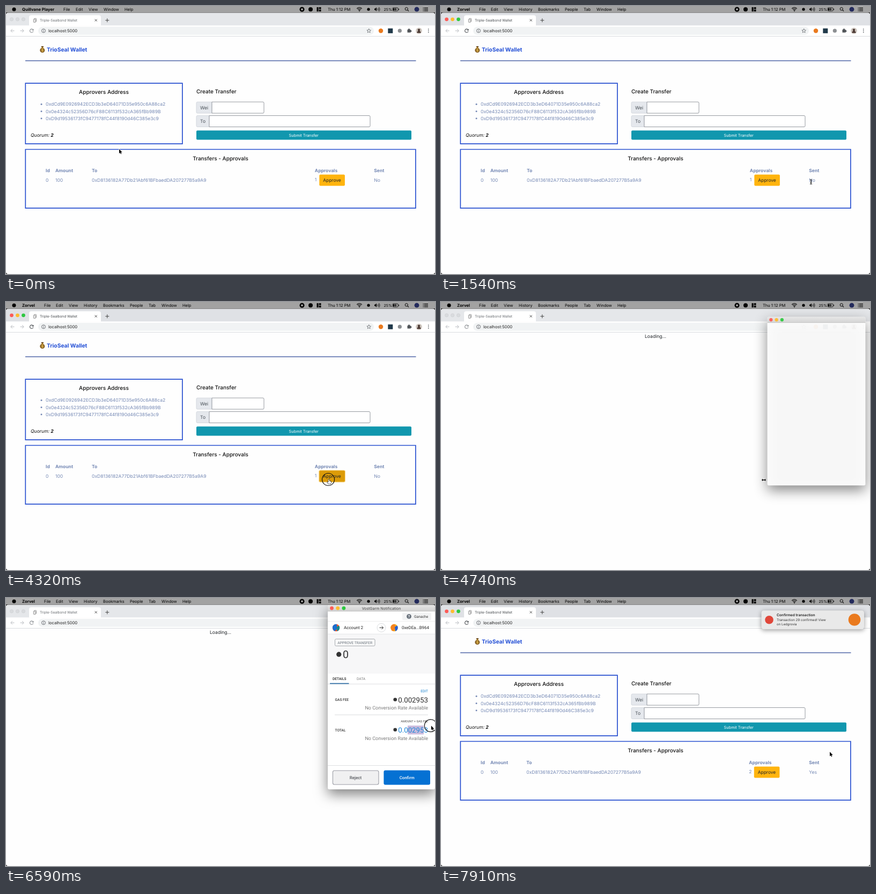
An HTML page with a canvas for the animation above (8000 ms loop, 800 px wide and 500 px high).

```html
<!DOCTYPE html>
<html lang="en">
<head>
<meta charset="utf-8">
<title>Wallet demo</title>
<style>
html, body { margin: 0; width: 100%; height: 100%; overflow: hidden; background: #fff; }
canvas { display: block; width: 800px; height: 500px; }
</style>
</head>
<body>
<canvas id="stage"></canvas>
<script>
const LOOP = 8000;
const SANS = 'Inter, "Liberation Sans", sans-serif';
const ROBOTO = 'Roboto, "Liberation Sans", sans-serif';
const BLUE = '#2850d0', SLATE = '#7488b4', ORANGE = '#ea7a1e';
const LIGHTS = ['#fc5b57', '#fdbc2f', '#2dc840'];

// Moments of the story, in ms
const T = {
  focus: 600, press: 4300, loading: 4430, popup: 4640, title: 4950, logo: 5130,
  confirm: 5740, drag: 6320, drop: 6680, accept: 6930, close: 7060, done: 7600, note: 7560
};
const PRESSES = [[T.focus - 40, T.focus + 60], [T.press, T.loading], [T.drag, T.drop], [T.accept, T.close]];

const ROUTE = [
  [0, 211, 267], [110, 211, 267], [520, 450, 348], [700, 465, 352], [820, 480, 350],
  [1300, 706, 344], [1500, 690, 328], [1700, 690, 328], [2080, 672, 368], [2420, 626, 374],
  [2760, 602, 331], [5560, 602, 331], [5860, 690, 292], [6260, 749, 246], [6320, 749, 246],
  [6570, 793, 238], [6690, 792, 240], [6900, 748, 333], [7080, 748, 333], [7500, 728, 295],
  [7850, 725, 287], [8000, 725, 287]
];

const canvas = document.getElementById('stage');
const ctx = canvas.getContext('2d');
const dpr = window.devicePixelRatio || 1;
canvas.width = 800 * dpr;
canvas.height = 500 * dpr;

const clamp = v => Math.min(1, Math.max(0, v));
const span = (t, a, b) => clamp((t - a) / (b - a));
const smooth = v => v * v * (3 - 2 * v);
const easeOut = v => 1 - (1 - v) ** 3;

function type(s, x, y, size, color = '#111', weight = 400, align = 'left', family = SANS) {
  ctx.font = `${weight} ${size}px ${family}`;
  ctx.textAlign = align;
  ctx.fillStyle = color;
  ctx.fillText(s, x, y);
}

function roboto(s, x, y, size, color, weight, align) {
  type(s, x, y, size, color, weight, align, ROBOTO);
}

function rect(x, y, w, h, color) {
  ctx.fillStyle = color;
  ctx.fillRect(x, y, w, h);
}

function box(x, y, w, h, r, fill, stroke, lw = 1) {
  ctx.beginPath();
  ctx.roundRect(x, y, w, h, r);
  if (fill) { ctx.fillStyle = fill; ctx.fill(); }
  if (stroke) { ctx.strokeStyle = stroke; ctx.lineWidth = lw; ctx.stroke(); }
}

function dot(x, y, r, color) {
  ctx.beginPath();
  ctx.arc(x, y, r, 0, 7);
  ctx.fillStyle = color;
  ctx.fill();
}

function arc(x, y, r, color, lw = 1, from = 0, to = 2 * Math.PI) {
  ctx.beginPath();
  ctx.arc(x, y, r, from, to);
  ctx.strokeStyle = color;
  ctx.lineWidth = lw;
  ctx.stroke();
}

function trace(points) {
  ctx.beginPath();
  for (let i = 0; i < points.length; i += 2) ctx.lineTo(points[i], points[i + 1]);
}

function line(color, lw, ...points) {
  trace(points);
  ctx.strokeStyle = color;
  ctx.lineWidth = lw;
  ctx.stroke();
}

function poly(color, ...points) {
  trace(points);
  ctx.closePath();
  ctx.fillStyle = color;
  ctx.fill();
}

function withShadow(blur, dy, alpha, draw) {
  ctx.save();
  ctx.shadowColor = `rgba(0,0,0,${alpha})`;
  ctx.shadowBlur = blur * dpr;
  ctx.shadowOffsetY = dy * dpr;
  draw();
  ctx.restore();
}

function menuBar(active) {
  rect(0, 0, 800, 12.2, '#a2a2a2');
  dot(15, 6.2, 3.5, '#000');
  type(active ? 'Zorvel' : 'Quillvane Player', 30, 9, 7.6, '#000', 700);
  const menus = active
    ? [['File', 71], ['Edit', 93], ['View', 117], ['History', 145], ['Bookmarks', 181],
       ['People', 231], ['Tab', 266], ['Window', 290], ['Help', 329]]
    : [['File', 107], ['Edit', 130], ['View', 154], ['Window', 182], ['Help', 221]];
  for (const [s, x] of menus) type(s, x, 9, 7.5, '#000');

  dot(552, 6.2, 4.5, '#000');
  box(550.2, 4.4, 3.6, 3.6, 1, '#a2a2a2');
  dot(568, 6.2, 4, '#000');
  rect(579.5, 2.2, 3.2, 8, '#000');
  rect(583.7, 2.2, 3.8, 3.5, '#000');
  rect(583.7, 6.7, 3.8, 3.5, '#000');
  type('Thu 1:12 PM', 600, 9, 7.5, '#000');
  for (const r of [2.4, 4.6, 6.8]) arc(659, 9.6, r, '#000', 1.1, -2.35, -0.79);
  dot(659, 9.3, 0.9, '#000');
  dot(676, 6.2, 2.6, '#000');
  poly('#000', 687, 4.8, 688.6, 4.8, 691, 2.6, 691, 9.8, 688.6, 7.6, 687, 7.6);
  for (const r of [2, 4, 6]) arc(691, 6.2, r, '#000', 0.8, -0.75, 0.75);
  type('25%', 704.5, 8.8, 7, '#000');
  box(721, 3.2, 10, 6, 1.2, null, '#000', 0.8);
  rect(722, 4.2, 2.4, 4, '#000');
  rect(732, 5, 1, 2.4, '#000');
  poly('#000', 727.5, 2.8, 724.5, 6.7, 726.6, 6.7, 725.6, 9.8, 728.8, 5.6, 726.8, 5.6);
  arc(746.8, 5.4, 2.6, '#000');
  line('#000', 1.1, 748.7, 7.3, 751, 9.7);
  dot(766, 6.2, 4.4, '#232a5c');
  for (let i = 0; i < 3; i++) {
    rect(777.5, 3 + i * 2.7, 1.2, 1.1, '#000');
    rect(779.6, 3 + i * 2.7, 7.4, 1.1, '#000');
  }
}

function star(x, y, r) {
  ctx.beginPath();
  for (let i = 0; i < 10; i++) {
    const a = i * Math.PI / 5 - Math.PI / 2, d = i % 2 ? r * 0.45 : r;
    ctx.lineTo(x + d * Math.cos(a), y + d * Math.sin(a));
  }
  ctx.closePath();
  ctx.strokeStyle = '#5f6368';
  ctx.lineWidth = 0.8;
  ctx.stroke();
}

function browser(active) {
  rect(0, 12.2, 800, 488, '#151515');
  box(0, 12.8, 800, 487.2, 4, '#fefefe');
  box(0, 12.8, 800, 23.7, [4, 4, 0, 0], active ? '#dfe1e5' : '#e5e7ea');
  [10.5, 21.5, 32.5].forEach((x, i) =>
    active ? dot(x, 24.8, 3.4, LIGHTS[i]) : box(x - 3.2, 21.6, 6.4, 6.4, 3.2, '#d9dbde', '#cdcfd2', 0.6));
  box(43, 17.3, 134, 19.5, [4, 4, 0, 0], '#fff');
  box(52.6, 23.2, 4, 6, 0.8, '#fff', '#777', 0.7);
  box(51.3, 24.5, 4, 6, 0.8, '#e6e6e6', '#777', 0.7);
  type('Triple-Sealbond Wallet', 63, 29, 6.5, active ? '#44484c' : '#666a6e');
  line('#444', 1, 165.7, 24.6, 169.7, 28.6);
  line('#444', 1, 169.7, 24.6, 165.7, 28.6);
  line('#444', 1, 185.3, 26.7, 192.3, 26.7);
  line('#444', 1, 188.8, 23.2, 188.8, 30.2);

  rect(0, 36.5, 800, 20, '#fff');
  line('#b9bcc0', 1, 12, 43, 8.8, 46.2, 12, 49.4);
  line('#b9bcc0', 1, 9, 46.2, 15.5, 46.2);
  line('#b9bcc0', 1, 30, 43, 33.2, 46.2, 30, 49.4);
  line('#b9bcc0', 1, 26.5, 46.2, 33, 46.2);
  const ink = active ? '#4f5357' : '#909498';
  arc(47.8, 46.2, 3.2, ink, 1.1, 0.3, 5.5);
  poly(ink, 51.6, 42.4, 51.6, 45.8, 48.2, 45.8);
  box(60, 38.8, 626, 15, 7.5, '#f1f3f4');
  arc(70, 46.2, 3.5, '#5f6368', 0.9);
  rect(69.5, 45.8, 1, 2.4, '#5f6368');
  rect(69.5, 44, 1, 1, '#5f6368');
  type('localhost:5000', 79, 49, 7.7, '#222');
  star(676.7, 46.4, 4);
  dot(699, 46.2, 4.2, ORANGE);
  rect(712.3, 41.8, 9, 9, '#20394a');
  dot(734.3, 46.2, 3.6, '#8c8f92');
  box(748.5, 44, 6.2, 5.6, 0.6, '#505458');
  dot(751.5, 43.6, 1.5, '#505458');
  dot(755, 46.8, 1.5, '#505458');
  dot(770, 46.2, 5.8, '#cfc7c0');
  dot(770, 44.8, 2.2, '#4a3832');
  ctx.beginPath();
  ctx.arc(770, 50.2, 3.6, Math.PI, 0);
  ctx.fill();
  for (const y of [43.2, 46.2, 49.2]) dot(787.8, y, 0.85, '#5f6368');
  rect(0, 56, 800, 0.9, '#d5d8dc');
}

function moneyBag(x, y) {
  poly('#6b4a1f', x - 2.3, y - 6, x + 2.5, y - 6, x + 1.3, y - 3, x - 1.1, y - 3);
  ctx.beginPath();
  ctx.ellipse(x, y + 1.6, 4.6, 4.5, 0, 0, 7);
  ctx.fillStyle = '#8a6428';
  ctx.fill();
  rect(x - 1.8, y - 3.4, 3.8, 1.2, '#e8b23c');
  type('$', x, y + 4, 6.5, '#f6cc56', 700, 'center');
}

function field(label, y, split, right) {
  box(355, y, split - 355, 21, [2, 0, 0, 2], '#e5e8ed', '#cdd2d9', 0.8);
  type(label, 362, y + 13.8, 8.6, '#495057');
  box(split, y, right - split, 21, [0, 2, 2, 0], '#fff', '#8b8f96', 0.9);
}

function walletPage(done, hover, pressed) {
  moneyBag(67.8, 81);
  type('TrioSeal Wallet', 76, 84.8, 10.3, '#2450d6', 700);
  rect(36, 101.2, 728.5, 1.9, '#7284b8');

  box(36.3, 144.2, 292.6, 113, 0, null, BLUE, 1.7);
  type('Approvers Address', 182.5, 164.3, 10.1, '#111', 500, 'center');
  ['0xdCd9E0926942ECD3b3eD64071D35e950c6A88ca2',
   '0x0e4324c52356D76cF88C6113f532cA365fBb989B',
   '0xD9d19536173fC9477178fC44f8190d46C385e3c9'].forEach((s, i) => {
    dot(66, 183.2 + i * 13.3, 1.5, SLATE);
    type(s, 74, 186.2 + i * 13.3, 8.6, SLATE);
  });
  type('Quorum:', 46, 244, 8.6, '#111', 'italic 400');
  type('2', 83.3, 244, 8.6, '#111', 'italic 700');

  type('Create Transfer', 355, 162.6, 10, '#111', 500);
  field('Wei', 179, 384, 481);
  field('To', 204.5, 379, 679);
  box(355, 232.3, 401, 17.3, 2, '#1197ae');
  type('Submit Transfer', 555.2, 243.7, 7.35, '#fff', 400, 'center');

  box(36.3, 267.5, 727.6, 109.7, 0, null, BLUE, 1.7);
  type('Transfers - Approvals', 400, 287.6, 10, '#111', 500, 'center');
  const to = done ? 159.3 : 160, count = done ? 574.2 : 575.8, nudge = done ? -0.5 : 0;
  [['Id', 74], ['Amount', 92], ['To', to], ['Approvals', count], ['Sent', 686.3]]
    .forEach(([s, x]) => type(s, x, 310.2, 8.5, SLATE, 700));
  [['0', 74], ['100', 92], ['0xD8136182A77Db21Abf61BFbaedDA207277B5a9A9', to],
   [done ? 'Yes' : 'No', 686.3]].forEach(([s, x]) => type(s, x, 328.3, 8.55, SLATE));
  type(done ? '2' : '1', count, 327.2, 8.55, SLATE);
  if (pressed) box(583, 313.5, 50, 23, 3, '#fbdc94');
  box(584.3 + nudge, 314.6, 47.6, 20.8, 2, pressed ? '#dc9b08' : hover ? '#eea708' : '#ffb40e');
  type('Approve', 608 + nudge, 328.3, 8.4, '#212529', 400, 'center');
}

function badge(x, base, a, b) {
  ctx.save();
  ctx.beginPath();
  ctx.arc(x, 55.5, 6.8, 0, 7);
  ctx.clip();
  rect(x - 7, 48, 14, 15, base);
  poly(a, x - 8, 52, x + 1, 47, x + 2, 57, x - 4, 64);
  poly(b, x + 1, 54, x + 8, 50, x + 8, 60, x + 2, 63);
  ctx.restore();
}

function amount(y, color) {
  dot(725.7, y - 5, 3.3, '#333');
  roboto('0.002953', 787, y, 13.3, color, 400, 'right');
  roboto('No Conversion Rate Available', 787, y + 13.8, 9, '#7a7a7a', 400, 'right');
}

function confirmView(t) {
  box(739, 27.2, 54, 14, 2, '#f2f3f4');
  dot(751.5, 34.4, 4.4, '#6a737d');
  roboto('?', 751.5, 37, 7, '#fff', 700, 'center');
  roboto('Ganache', 761, 37, 6.7, '#333');
  rect(600, 43, 200, 0.7, '#e6e6e6');
  badge(615.5, '#f0532a', '#1b6fd0', '#178a8c');
  roboto('Account 2', 630, 58.4, 8, '#222');
  badge(724, '#f7a81b', '#f5841f', '#2463d8');
  roboto('0xeDEa...B964', 738, 58.3, 7.9, '#222');
  rect(600, 67, 200, 74, '#f7f7f8');
  rect(600, 66.8, 200, 0.7, '#dcdee0');
  box(692, 47.4, 16, 16, 8, '#fff', '#d0d3d6', 0.8);
  line('#333', 1, 696.5, 55.4, 703.3, 55.4);
  line('#333', 1, 700.6, 52.4, 703.6, 55.4, 700.6, 58.4);

  box(613.5, 76.6, 74.5, 12.8, 2, '#fafafa', '#90959a', 0.8);
  roboto('APPROVE TRANSFER', 650.7, 85.6, 6.8, '#6a737d', 400, 'center');
  dot(620.7, 105.2, 4.6, '#333');
  roboto('0', 628, 112.4, 19.5, '#333');

  roboto('DETAILS', 609, 153, 6.6, '#222', 500);
  roboto('DATA', 654, 153, 6.6, '#777');
  rect(600, 160, 200, 0.8, '#d6d8da');
  rect(604, 158.7, 35.5, 1.7, '#2d6ea6');
  roboto('EDIT', 787, 175.6, 6.6, '#0c7bcb', 400, 'right');
  roboto('GAS FEE', 613.5, 192.2, 6.6, '#333', 500);
  amount(194.5, '#2c2c2c');
  rect(613, 217.6, 174, 0.8, '#d0d2d4');
  roboto('AMOUNT + GAS FEE', 787, 231.6, 5.6, '#444', 400, 'right');
  roboto('TOTAL', 613.5, 248.8, 6.6, '#333', 500);
  rect(749, 238, 30 * span(t, T.drag, 6560), 16.5, '#cbbbdc');
  amount(250.8, '#1c87d8');

  rect(600, 312.2, 200, 0.8, '#d6d8da');
  box(609.4, 322, 85.6, 26, 3, '#f0f0f1', '#9a9ca4', 1.1);
  roboto('Reject', 652, 337.9, 8, '#55585d', 500, 'center');
  box(704.4, 321.5, 86.6, 27, 3, t > T.accept ? '#0362b8' : '#0571d3');
  roboto('Confirm', 747.7, 337.9, 7.8, '#fff', 500, 'center');
}

function popup(t) {
  if (t < T.popup || t >= T.close + 80) return;
  const grow = span(t, T.popup, T.popup + 260);
  const scale = 0.8 + 0.2 * smooth(clamp(grow * 0.9 + 0.2));
  ctx.save();
  ctx.globalAlpha = (0.8 + 0.2 * clamp(grow * 1.7)) * (1 - span(t, T.close, T.close + 80));
  ctx.translate(700, 185);
  ctx.scale(scale, scale);
  ctx.translate(-700, -185);
  withShadow(25, 9, 0.5, () => box(600, 13, 200, 344, 3, '#fff'));
  const bar = ctx.createLinearGradient(0, 13, 0, 25);
  bar.addColorStop(0, '#e6e6e6');
  bar.addColorStop(1, '#d0d0d0');
  box(600, 13, 200, 12, [3, 3, 0, 0], bar);
  rect(600, 24.5, 200, 0.6, '#b8b8b8');
  [607.5, 618.7, 629.9].forEach((x, i) => dot(x, 19, 3.4, LIGHTS[i]));
  if (t > T.title) type('VostGarm Notification', 700, 21.6, 7, '#444', 400, 'center');
  if (t > T.confirm) {
    confirmView(t);
  } else if (t > T.logo) {
    dot(700.7, 159, 40, ORANGE);
    const a = (t - 5550) / 1000 * 2 * Math.PI - 1.4;
    arc(700, 220.5, 6.4, '#f08524', 1.9, a, a + 4.6);
  }
  ctx.restore();
}

function notification(t) {
  if (t < T.note) return;
  ctx.save();
  ctx.translate(205 * (1 - easeOut(span(t, T.note, T.note + 320))), 0);
  withShadow(9, 2, 0.4, () => box(597.5, 23.3, 191.5, 35, 4.5, '#e9e9e9'));
  dot(612, 40.7, 7.8, '#e0473a');
  type('Confirmed transaction', 626, 34, 6.6, '#222', 600);
  type('Transaction 29 confirmed! View', 626, 43.4, 6.1, '#333');
  type('on Ledgrovia', 626, 51.3, 6.1, '#333');
  dot(771, 40.5, 11.3, ORANGE);
  ctx.restore();
}

function pointerAt(t) {
  const i = Math.max(1, ROUTE.findIndex(k => k[0] > t));
  const [t0, x0, y0] = ROUTE[i - 1], [t1, x1, y1] = ROUTE[i];
  const k = smooth(span(t, t0, t1));
  return [x0 + (x1 - x0) * k, y0 + (y1 - y0) * k];
}

function outlined(fill, edge, lw, points) {
  trace(points);
  ctx.closePath();
  ctx.lineJoin = 'round';
  ctx.strokeStyle = edge;
  ctx.lineWidth = lw;
  ctx.stroke();
  ctx.fillStyle = fill;
  ctx.fill();
}

const SHAPES = {
  arrow() {
    outlined('#000', '#fff', 1.2, [0, 0, 0, 8.2, 1.9, 6.5, 3.1, 9.2, 4.4, 8.7, 3.2, 6, 5.7, 6]);
  },
  hand() {
    outlined('#fff', '#000', 1.2, [-0.7, 0, 0.7, 0, 0.9, 3, 3.9, 3.7, 4.2, 5.4, 3.3, 8.4, -0.8, 8.4, -3, 5.2, -2.2, 4.6, -0.7, 5.8]);
  },
  beam() {
    line('#222', 0.9, -2, -4.4, 0, -3.7, 0, 3.9, -2, 4.6);
    line('#222', 0.9, 2, -4.4, 0, -3.7, 0, 3.9, 2, 4.6);
    line('#222', 0.9, -1.2, 1.4, 1.2, 1.4);
  },
  resize() {
    outlined('#000', '#fff', 1, [-4, 1, -1.9, -1.4, -1.9, 0.2, 1.9, 0.2, 1.9, -1.4, 4, 1, 1.9, 3.4, 1.9, 1.8, -1.9, 1.8, -1.9, 3.4]);
  }
};

function pointer(t, x, y, hover) {
  let shape = 'arrow';
  const open = t > T.popup && t < T.close;
  if (open && x < 604) shape = 'resize';
  else if (hover || (open && t > T.confirm && x > 704 && y > 321)) shape = 'hand';
  else if (t < T.loading && Math.hypot(x - 692, y - 325) < 9) shape = 'beam';
  ctx.save();
  ctx.translate(x, y);
  SHAPES[shape]();
  ctx.restore();
  if (PRESSES.some(([a, b]) => t >= a && t < b)) arc(x - 1, y, 11.5, '#111', 1.2);
}

function draw(t) {
  ctx.setTransform(dpr, 0, 0, dpr, 0, 0);
  ctx.textRendering = 'geometricPrecision';
  const [x, y] = pointerAt(t);
  const loading = t >= T.loading && t < T.done;
  const hover = !loading && x > 584 && x < 632 && y > 314 && y < 336;
  browser(t >= T.focus && (t < T.popup || t >= T.close));
  if (loading) type('Loading...', 400, 66.6, 8.6, '#212529', 400, 'center');
  else walletPage(t >= T.done, hover, t >= T.press && t < T.loading);
  popup(t);
  notification(t);
  menuBar(t >= T.focus);
  pointer(t, x, y, hover);
}

const start = performance.now();
function tick() {
  draw((performance.now() - start) % LOOP);
  requestAnimationFrame(tick);
}
tick();
</script>
</body>
</html>
```
